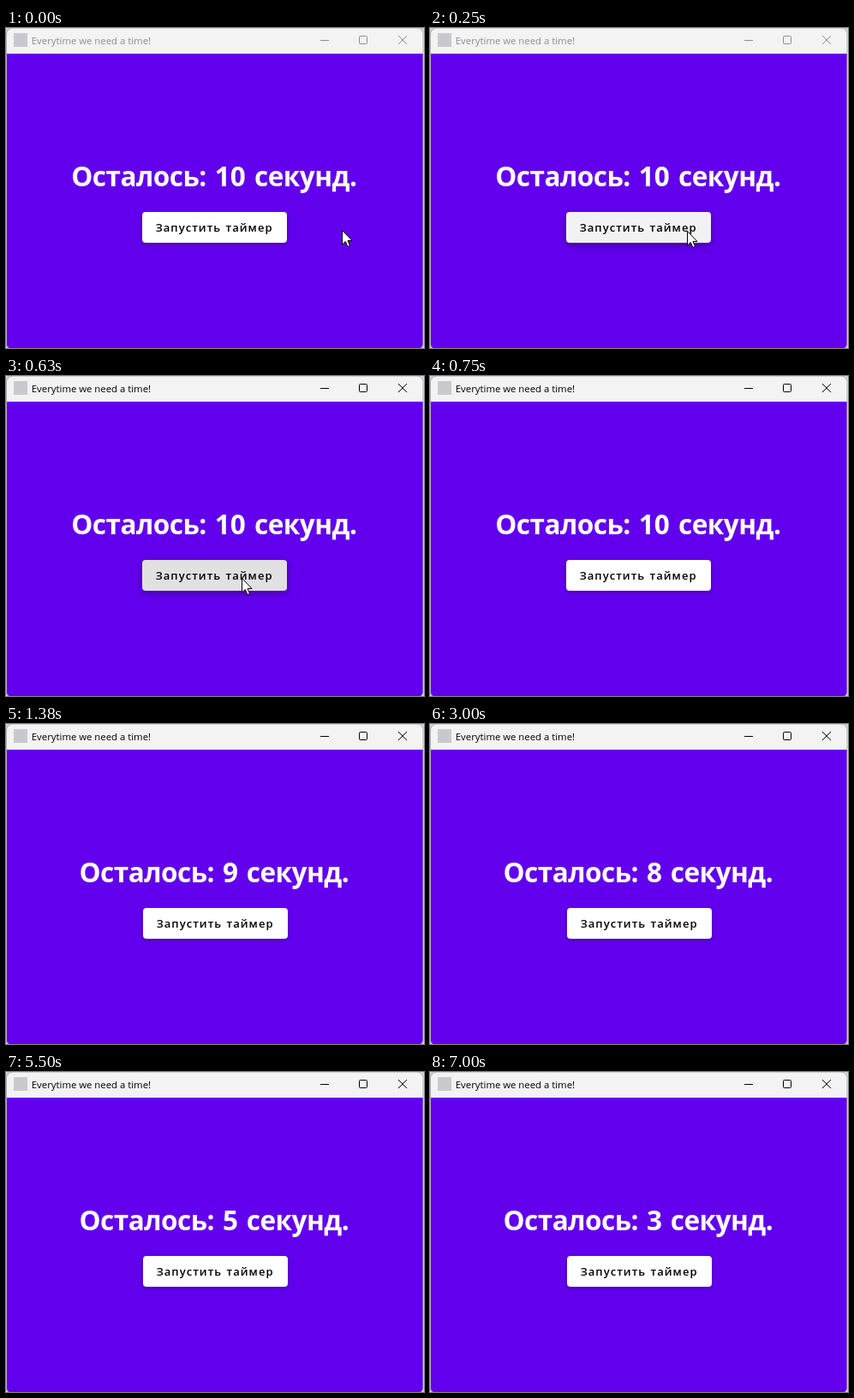
Animation, 488 px wide and 374 px high, one loop 8 s. Source, as an HTML page with a canvas:

```html
<!DOCTYPE html>
<html lang="ru">
<head>
<meta charset="utf-8">
<title>Timer</title>
<style>
html, body { margin: 0; width: 488px; height: 374px; overflow: hidden; background: #d2d2d6; }
canvas { display: block; }
</style>
</head>
<body>
<canvas id="stage" width="488" height="374"></canvas>
<script>
const ctx = document.getElementById('stage').getContext('2d');
const LOOP = 8000;
const FONT = '"Open Sans", "Noto Sans", sans-serif';

// [start ms, seconds left]
const counts = [[0, 10], [1380, 9], [1880, 8], [3500, 7], [3750, 6], [5500, 5], [6630, 4], [7000, 3]];

// pointer tip, window focus, hover and ripple radius
const steps = [
  { at: 0, pointer: [392, 236] },
  { at: 130, pointer: [352, 237] },
  { at: 250, pointer: [300, 237], hover: true },
  { at: 380, pointer: [275, 236], hover: true, active: true },
  { at: 500, pointer: [275, 236], hover: true, active: true, ripple: 89, ink: 0.11 },
  { at: 630, pointer: [275, 236], hover: true, active: true, ripple: 120, ink: 0.07 },
  { at: 750, active: true }
];

function text(str, x, y, weight, size, color, spacing = 0) {
  ctx.font = `${weight} ${size}px ${FONT}`;
  ctx.letterSpacing = spacing + 'px';
  ctx.fillStyle = color;
  ctx.fillText(str, x, y);
}

function box(x, y, w, h, r) {
  ctx.beginPath();
  ctx.roundRect(x, y, w, h, r);
}

function drawWindow(active) {
  ctx.fillStyle = '#d2d2d6';
  ctx.fillRect(0, 0, 488, 374);
  box(0, 0, 487, 375, [7, 7, 5, 5]);
  ctx.fillStyle = '#b0abc0';
  ctx.fill();
  ctx.save();
  box(1, 0.5, 485.5, 374, [7, 7, 5, 5]);
  ctx.clip();
  ctx.fillStyle = '#f3f3f3';
  ctx.fillRect(0, 0, 488, 30);
  ctx.fillStyle = '#6200ee';
  ctx.fillRect(0, 30, 488, 345);
  ctx.restore();

  ctx.fillStyle = '#c8c9cf';
  ctx.fillRect(9, 6, 16, 16);

  const color = active ? '#000' : '#8c8c8c';
  text('Everytime we need a time!', 29.8, 19, 400, 11.35, color);
  ctx.strokeStyle = color;
  ctx.lineWidth = 1;
  ctx.beginPath();
  ctx.moveTo(367, 14.5);
  ctx.lineTo(377, 14.5);
  ctx.roundRect(412.5, 9.5, 9, 9, 1);
  ctx.moveTo(458, 9);
  ctx.lineTo(468, 19);
  ctx.moveTo(468, 9);
  ctx.lineTo(458, 19);
  ctx.stroke();
}

function drawHeading(count) {
  const shift = count > 9 ? 0 : 9.3;
  text('Осталось:', 76.2 + shift, 185, 700, 31.5, '#fff', -0.5);
  text(String(count), 243.8 + shift, 185, 700, 31.5, '#fff');
  text('секунд.', 290 - shift, 185, 700, 31.5, '#fff', -0.5);
}

function drawButton(x, { hover, ripple, ink }) {
  ctx.save();
  ctx.shadowColor = 'rgba(0,0,0,.3)';
  ctx.shadowBlur = hover ? 8 : 4;
  ctx.shadowOffsetY = hover ? 3 : 1.5;
  box(x, 215, 169, 36, 4);
  ctx.fillStyle = hover ? '#f2f2f2' : '#fff';
  ctx.fill();
  ctx.restore();
  if (ripple) {
    ctx.save();
    ctx.clip();
    ctx.beginPath();
    ctx.arc(256, 234, ripple, 0, Math.PI * 2);
    ctx.fillStyle = `rgba(0,0,0,${ink})`;
    ctx.fill();
    ctx.restore();
  }
  text('Запустить', x + 15.7, 238, 600, 13, '#000', 1.05);
  text('таймер', x + 97.5, 238, 600, 13, '#000', 1.05);
}

function drawPointer([x, y]) {
  const shape = [[0, 0], [0, 16.5], [3.8, 13], [6.4, 19], [9, 17.9], [6.5, 12], [11.5, 12]];
  ctx.beginPath();
  for (const [dx, dy] of shape) ctx.lineTo(x + 0.5 + dx, y + 0.5 + dy);
  ctx.closePath();
  ctx.fillStyle = '#fff';
  ctx.fill();
  ctx.strokeStyle = '#000';
  ctx.lineWidth = 1;
  ctx.stroke();
}

function frame() {
  const t = performance.now() % LOOP;
  const step = steps.findLast(s => s.at <= t);
  const count = counts.findLast(c => c[0] <= t)[1];
  drawWindow(step.active);
  drawHeading(count);
  drawButton(count > 9 ? 159 : 160, step);
  if (step.pointer) drawPointer(step.pointer);
  requestAnimationFrame(frame);
}
frame();
</script>
</body>
</html>
```
